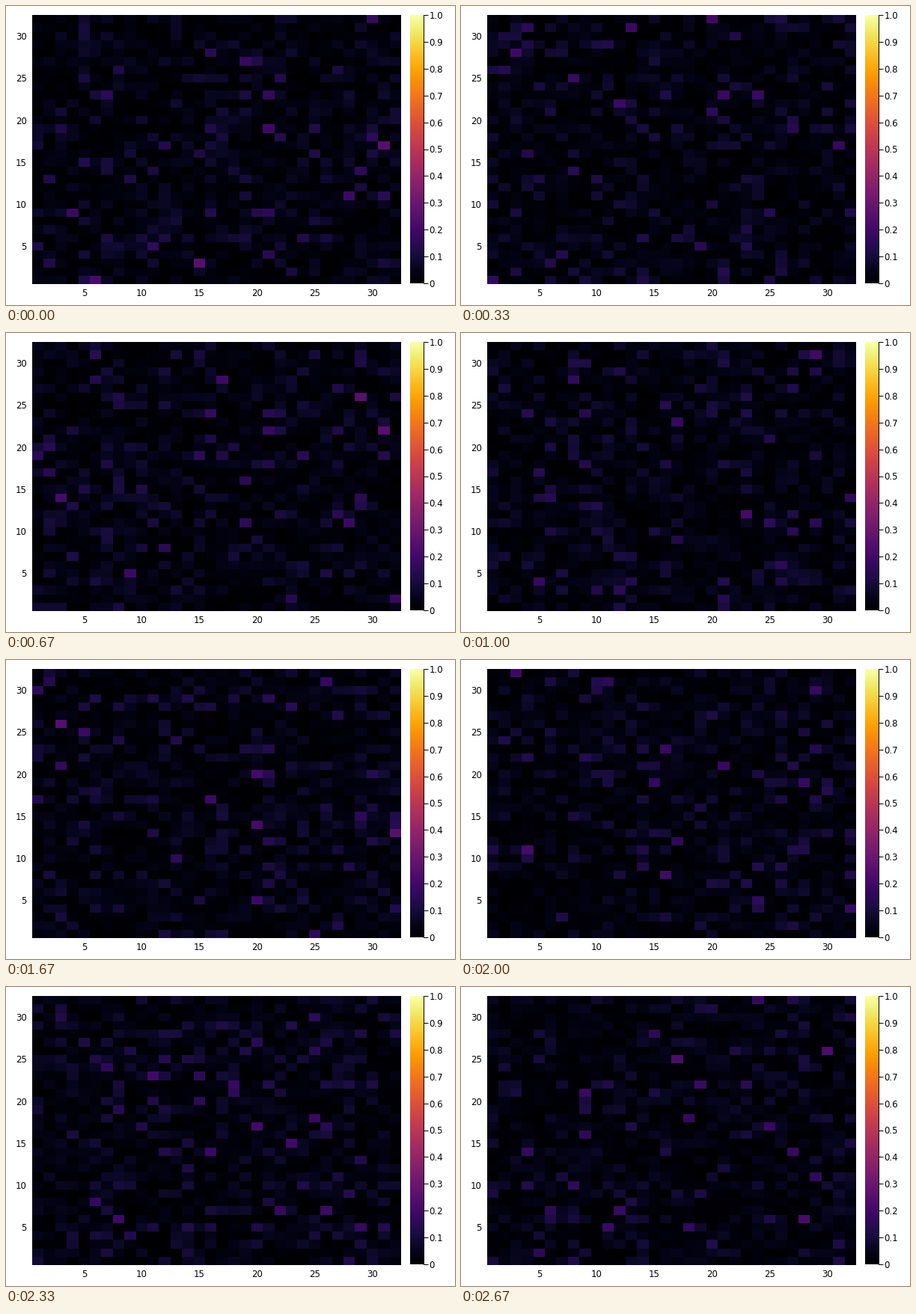
A matplotlib script for the animation above (3010 ms loop, 600 px wide and 400 px high).

```python
import matplotlib.pyplot as plt
import numpy as np
from matplotlib.animation import FuncAnimation

W, H, DPI = 600, 400, 100
N = 32
STEPS = 9
FRAMES, INTERVAL = 301, 10
MEAN, PEAK = 0.034, 0.25


def make_field(step):
    """Exponentially distributed intensities on an N x N grid."""
    rng = np.random.default_rng(40 + step)
    return np.minimum(rng.exponential(MEAN, (N, N)), PEAK)


def pixel_axes(left, top, right, bottom):
    ax = fig.add_axes([left / W, 1 - bottom / H, (right - left) / W, (bottom - top) / H])
    ax.spines[:].set_visible(False)
    return ax


plt.rcParams.update({"font.family": "DejaVu Sans", "font.size": 8.5})
fig = plt.figure(figsize=(W / DPI, H / DPI), dpi=DPI, facecolor="white")
fields = [make_field(step) for step in range(STEPS)]
style = dict(cmap="inferno", vmin=0, vmax=1, origin="lower", aspect="auto")

ax = pixel_axes(35, 12, 528, 372)
heat = ax.imshow(fields[0], interpolation="nearest",
                 extent=(0.5, N + 0.5, 0.5, N + 0.5), **style)
ticks = range(5, N, 5)
ax.set_xticks(ticks)
ax.set_yticks(ticks)
ax.tick_params(axis="x", length=0, pad=4.6)
ax.tick_params(axis="y", length=0, pad=5.2)

bar = pixel_axes(540, 12, 558, 371)
bar.imshow(np.linspace(0, 1, 256)[:, None], extent=(0, 1, 0, 1), **style)
bar.set_xticks([])
bar.set_yticks([k / 10 for k in range(11)],
               ["0"] + [f"{k / 10:.1f}" for k in range(1, 11)])
bar.yaxis.tick_right()
bar.tick_params(length=4, width=0.72, pad=1.5)
bar.spines["right"].set(visible=True, linewidth=0.72)


def update(n):
    step = min((3 * n + 1) // 100, STEPS - 1)
    heat.set_data(fields[step])
    return (heat,)


anim = FuncAnimation(fig, update, frames=FRAMES, interval=INTERVAL,
                     repeat=True, repeat_delay=0)
plt.show()
```
